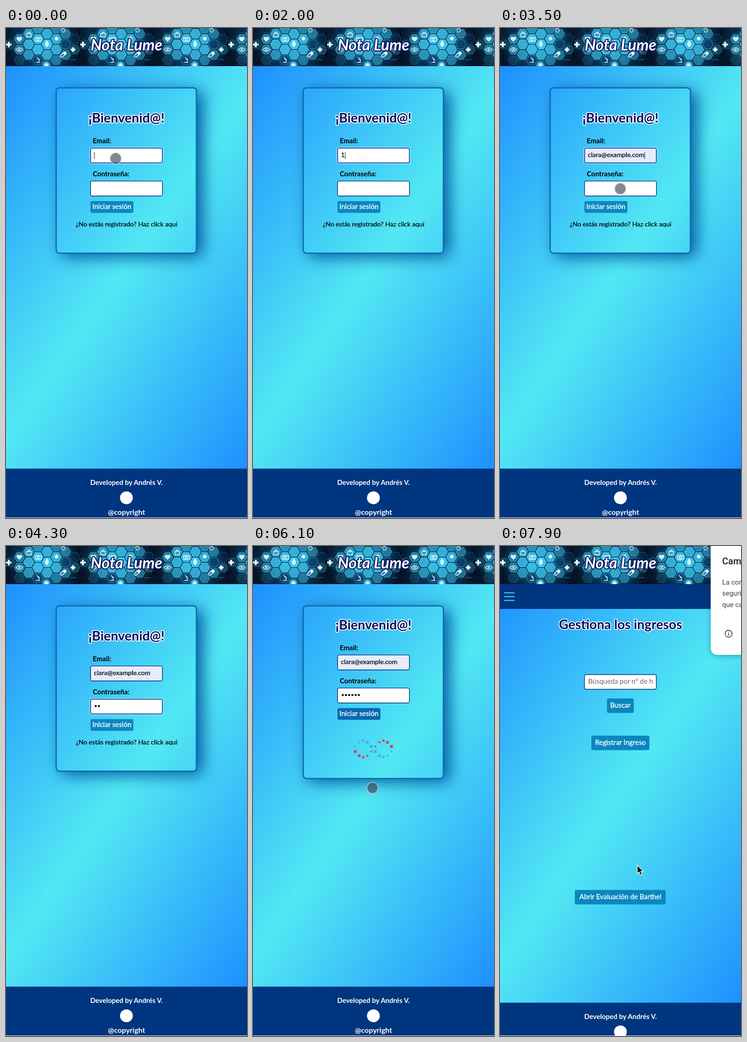
Animation, 525 px wide and 1067 px high, one loop 8000 ms. Source, as an HTML page:

```html
<!DOCTYPE html>
<html lang="es">
<head>
<meta charset="utf-8">
<title>Acceso</title>
<style>
html, body { margin: 0; width: 100%; height: 100%; overflow: hidden; background: #fff; }
svg { display: block; width: 100%; height: 100%; }
text { font-family: Lato, "Open Sans", sans-serif; font-size: 15px; }
.mid { text-anchor: middle; }
.bold { font-weight: 700; }
.brand { font-size: 34px; font-weight: 700; font-style: italic; fill: #fff; stroke: #0a1458; stroke-width: 4px; paint-order: stroke; stroke-linejoin: round; }
.title { font-size: 28.5px; font-weight: 700; fill: #0a0a58; stroke: #fff; stroke-width: 3.5px; paint-order: stroke; stroke-linejoin: round; }
.button rect { fill: #0a87be; }
.button text { fill: #fff; stroke: #fff; stroke-width: .35px; }
.box { fill: #fff; stroke: #0b2a70; stroke-width: 1.4px; }
.ring { fill: none; stroke: #d8f1fc; stroke-width: 1.5px; visibility: hidden; }
.focus .box { stroke: #0f4fa6; stroke-width: 2px; }
.focus .ring { visibility: visible; }
.filled .box { fill: #e6ecfd; }
.value, .link { font-size: 14.2px; stroke: #000; stroke-width: .25px; }
.caret { stroke: #333; stroke-width: 1.2px; visibility: hidden; }
#card, #shade { height: 360px; }
.busy #card, .busy #shade { height: 376px; }
.busy #form { transform: translateY(-24px); }
.busy .button rect { fill: #0769b0; }
.busy .link, .done #login, #admin, #dna { display: none; }
.busy #dna, .done #admin { display: inline; }
.done #footer { transform: translateY(35px); }
#popup text { font-family: Roboto, Inter, sans-serif; fill: #3c4043; }
#popup .head { font-size: 20px; font-weight: 500; fill: #1f2023; }
#popup { animation: popup 8s step-end infinite; }
#touch { animation: touch 8s ease-in-out infinite; }
@keyframes popup { 0% { visibility: hidden; } 92.4%, 100% { visibility: visible; } }
@keyframes touch {
  0%, 11% { transform: translate(239px, 284px); opacity: 1; }
  11.1%, 25% { transform: translate(239px, 284px); opacity: 0; }
  25.1% { transform: translate(239px, 284px); opacity: 1; }
  33%, 36.5% { transform: translate(369px, 430px); opacity: 1; }
  42.5%, 47% { transform: translate(262px, 350px); opacity: 1; }
  47.1%, 63% { transform: translate(262px, 350px); opacity: 0; }
  63.1% { transform: translate(262px, 350px); opacity: 1; }
  68%, 72% { transform: translate(228px, 384px); opacity: 1; }
  81%, 88.7% { transform: translate(299px, 698px); opacity: 1; }
  88.8%, 100% { transform: translate(299px, 698px); opacity: 0; }
}
</style>
</head>
<body>
<svg id="stage" viewBox="0 0 525 1067" preserveAspectRatio="none">
  <defs>
    <linearGradient id="sky" gradientUnits="userSpaceOnUse" x1="-119" y1="254" x2="644" y2="788">
      <stop offset="0" stop-color="#1e90ff"/><stop offset=".5" stop-color="#52e8f3"/><stop offset="1" stop-color="#1e90ff"/>
    </linearGradient>
    <linearGradient id="skyTall" href="#sky" x1="-127" y1="265" x2="652" y2="811"/>
    <radialGradient id="glow" gradientUnits="userSpaceOnUse" cx="82" cy="36" r="80">
      <stop offset="0" stop-color="#0c5a92"/><stop offset=".5" stop-color="#07385f"/><stop offset="1" stop-color="#020c1f"/>
    </radialGradient>
    <radialGradient id="spark"><stop offset="0" stop-color="#fff"/><stop offset=".3" stop-color="#9ff3ff"/><stop offset="1" stop-color="#4fd8f5" stop-opacity="0"/></radialGradient>
    <filter id="soft" x="-30%" y="-30%" width="160%" height="160%"><feGaussianBlur stdDeviation="18"/></filter>
    <filter id="softer" x="-50%" y="-50%" width="200%" height="200%"><feGaussianBlur stdDeviation="6"/></filter>
    <clipPath id="searchClip"><rect x="190" y="281" width="143" height="30"/></clipPath>
    <clipPath id="page"><rect width="525" height="1066"/></clipPath>
    <pattern id="cells" width="161.5" height="83" patternUnits="userSpaceOnUse">
      <rect width="161.5" height="83" fill="url(#glow)"/>
      <g id="hexes"></g>
      <circle cx="88" cy="81" r="11" fill="url(#spark)"/>
      <g fill="none" stroke="#e2fbff" stroke-width="1.4">
        <path d="M29 29l-5-5q-1-4 2-4 2 0 3 2 1-2 3-2 3 0 2 4z" fill="#bff3ff"/>
        <path d="M22 47q7-8 14 0q-7 8-14 0z"/><circle cx="29" cy="47" r="1.5"/>
        <path d="M45 12h10v7h-10zM48 12v-3h4v3M64 21h13v8h-13z"/><circle cx="70" cy="25" r="2.5"/>
        <path d="M89 41q-7-5 0-13q7 8 0 13z" fill="#c8f6ff"/>
        <path d="M65 75h9M67 63l4 7M70 66q5 3 1 8"/>
        <circle cx="125" cy="5" r="4"/>
        <path d="M108 68h7m-7 4h5m-5 4h7M140 69h13" stroke="#2688b8" stroke-width="1"/>
      </g>
      <path d="M121 61l7-6" stroke="#f0fdff" stroke-width="7" stroke-linecap="round"/>
      <path d="M121 61l3.5-3" stroke="#1a7fb4" stroke-width="4" stroke-linecap="round"/>
      <path d="M6 30v12M0 36h12M146 42v10M141 47h10M110 19v8M106 23h8" stroke="#e6fcff" stroke-width="4"/>
    </pattern>
  </defs>

  <g clip-path="url(#page)">
    <g id="login">
      <rect y="83" width="525" height="880" fill="url(#sky)"/>
      <rect id="shade" x="120" y="138" width="308" rx="8" fill="#04559c" filter="url(#soft)"/>
      <rect id="card" x="109.3" y="130.3" width="305.5" rx="7" fill="url(#sky)" stroke="#0a6cb2" stroke-width="2.8"/>
      <g id="form">
        <text class="title mid" x="262.5" y="206">¡Bienvenid@!</text>
        <text class="bold" x="189" y="250.5">Email:</text>
        <g id="email">
          <rect class="ring" x="182.7" y="259.9" width="159.4" height="35.4" rx="5"/>
          <rect class="box" x="184.2" y="261.4" width="156.5" height="32.4" rx="3.5"/>
          <text id="address" class="value" x="191.5" y="281"></text>
          <path class="caret" d="M1 270v15"/>
        </g>
        <text class="bold" x="189" y="322.5">Contraseña:</text>
        <g id="password">
          <rect class="ring" x="182.7" y="331.9" width="159.4" height="35.4" rx="5"/>
          <rect class="box" x="184.2" y="333.4" width="156.5" height="32.4" rx="3.5"/>
          <g id="bullets"></g>
          <path class="caret" d="M1 342v15"/>
        </g>
        <g class="button"><rect x="184" y="377" width="93.5" height="25.5" rx="3.5"/><text class="mid" x="230.7" y="393.5">Iniciar sesión</text></g>
        <text class="link mid" x="262.5" y="431.5">¿No estás registrado? Haz click aquí</text>
      </g>
      <g id="dna"></g>
    </g>

    <g id="admin">
      <rect y="83" width="525" height="915" fill="url(#skyTall)"/>
      <rect y="83" width="525" height="54" fill="#00357f"/>
      <path d="M10 102h21M10 110.3h21M10 118.6h21" stroke="#3dbfe9" stroke-width="2.5" stroke-linecap="round"/>
      <text class="title mid" x="262.5" y="181">Gestiona los ingresos</text>
      <rect class="box" x="184" y="280" width="156.5" height="32" rx="3.5"/>
      <text x="192" y="300" fill="#6b6b70" clip-path="url(#searchClip)">Búsqueda por nº de historia</text>
      <g class="button"><rect x="233" y="332" width="58.5" height="31.5" rx="3.5"/><text class="mid" x="262.3" y="352">Buscar</text></g>
      <g class="button"><rect x="199" y="413" width="126.5" height="31.5" rx="3.5"/><text class="mid" x="262.3" y="432.5">Registrar Ingreso</text></g>
      <g class="button"><rect x="163" y="749" width="198" height="31.5" rx="3.5"/><text class="mid" x="262.3" y="769">Abrir Evaluación de Barthel</text></g>
    </g>

    <g id="footer">
      <rect y="959.5" width="525" height="120" fill="#00357f"/>
      <g fill="#fff" class="bold">
        <text class="mid" x="262.5" y="995">Developed by Andrés V.</text>
        <circle cx="262.3" cy="1023" r="14"/>
        <text class="mid" x="262.5" y="1060" style="font-size:16px">@copyright</text>
      </g>
    </g>

    <rect width="525" height="83" fill="url(#cells)"/>
    <text class="brand mid" x="262.5" y="49">Nota Lume</text>

    <g id="popup">
      <rect x="459" y="-20" width="100" height="259" rx="14" fill="#0a3c70" opacity=".45" filter="url(#softer)"/>
      <rect x="459" y="-20" width="100" height="257" rx="14" fill="#fff"/>
      <text class="head" x="484" y="40">Cambia la contraseña</text>
      <text x="484" y="84">La contraseña</text>
      <text x="484" y="108">seguridad</text>
      <text x="484" y="133">que cambies</text>
      <circle cx="498" cy="191" r="7.6" fill="none" stroke="#3c4043" stroke-width="1.6"/>
      <path d="M498 190v5M498 186.5v1.8" stroke="#3c4043" stroke-width="1.7"/>
    </g>
    <path id="arrow" d="M299 695v18l4-3.5 3 7 3.5-1.5-3-6.5h5.5z" stroke="#fff" stroke-width="1.3"/>
    <circle id="touch" r="12.2" fill="#3f434d" fill-opacity=".64" stroke="#c9e0e8" stroke-opacity=".65" stroke-width="2"/>
  </g>
</svg>
<script>
const LOOP = 8000;
const FILL = 2400, PASSWORD = 3550, SUBMIT = 5800, DONE = 7100;
const CARET_RESETS = [0, 650, FILL, PASSWORD];
const KEY_TIMES = [3900, 4150, 4400, 4650, 4850, 5050];
const byId = id => document.getElementById(id);
const stage = byId('stage'), email = byId('email'), password = byId('password'), address = byId('address');

function add(parent, tag, attrs) {
  const node = document.createElementNS(stage.namespaceURI, tag);
  for (const key in attrs) node.setAttribute(key, attrs[key]);
  return parent.appendChild(node);
}

// Flat-top honeycomb, brightest near the middle of each tile
let seed = 11;
const random = () => (seed = (seed * 16807) % 2147483647) / 2147483647;
for (let col = 0; col < 8; col++) {
  for (let row = 0; row < 4; row++) {
    const x = 8.8 + col * 20.19, y = (col % 2 ? 1 : 12.5) + row * 23;
    const light = Math.max(0, 1 - (Math.hypot(x - 82, (y - 34) * 1.5) / 82) ** 2);
    const points = Array.from({ length: 6 }, (_, i) =>
      [x + 11.6 * Math.cos(i * Math.PI / 3), y + 11.6 * Math.sin(i * Math.PI / 3)].map(v => v.toFixed(1)));
    add(byId('hexes'), 'polygon', {
      points: points.join(' '),
      fill: random() < .6 ? '#3fcbf0' : '#0a4a7c',
      'fill-opacity': (.04 + light * .9).toFixed(2),
      stroke: '#5fdcf8',
      'stroke-opacity': (.1 + light * .8).toFixed(2)
    });
  }
}

const bullets = KEY_TIMES.map((_, i) => add(byId('bullets'), 'circle', { cx: 195.5 + i * 7, cy: 348.5, r: 2.3 }));
const strands = [
  { side: -1, fill: '#2f7fa8', opacity: .45 },
  { side: 1, fill: '#d93a5c', opacity: .95 }
].map(({ side, fill, opacity }) => ({
  side,
  dots: Array.from({ length: 10 }, (_, i) => add(byId('dna'), 'circle', { cx: 222.5 + i * 8.8, fill, opacity }))
}));

function spinHelix(t) {
  const turn = (t - 6900) / 2000 * 2 * Math.PI;
  for (const { side, dots } of strands) {
    dots.forEach((dot, i) => {
      const angle = Math.PI * (i - .5) / 5 + turn;
      dot.setAttribute('cy', 442 - side * 18 * Math.sin(angle));
      dot.setAttribute('r', 2.7 - side * .8 * Math.cos(angle));
    });
  }
}

function showCaret(field, on, x) {
  const caret = field.querySelector('.caret');
  caret.style.visibility = on ? 'visible' : 'hidden';
  caret.setAttribute('transform', `translate(${x} 0)`);
}

function render() {
  const t = performance.now() % LOOP;
  const busy = t >= SUBMIT && t < DONE;
  const inEmail = t < PASSWORD, inPassword = !inEmail && t < SUBMIT;
  const keys = KEY_TIMES.filter(time => t >= time).length;
  const blink = (t - CARET_RESETS.filter(time => time <= t).pop()) % 1000 < 500;

  stage.classList.toggle('busy', busy);
  stage.classList.toggle('done', t >= DONE);
  email.classList.toggle('focus', inEmail);
  email.classList.toggle('filled', t >= FILL);
  password.classList.toggle('focus', inPassword);
  byId('arrow').style.visibility = t >= DONE ? 'visible' : 'hidden';

  const value = t < 650 ? '' : t < FILL ? '1' : 'clara@example.com';
  if (address.textContent !== value) address.textContent = value;
  bullets.forEach((dot, i) => dot.style.visibility = i < keys ? 'inherit' : 'hidden');
  showCaret(email, inEmail && blink, inEmail ? 191.5 + address.getComputedTextLength() : 0);
  showCaret(password, inPassword && blink, 191.5 + keys * 7);
  if (busy) spinHelix(t);
  requestAnimationFrame(render);
}
render();
</script>
</body>
</html>
```
